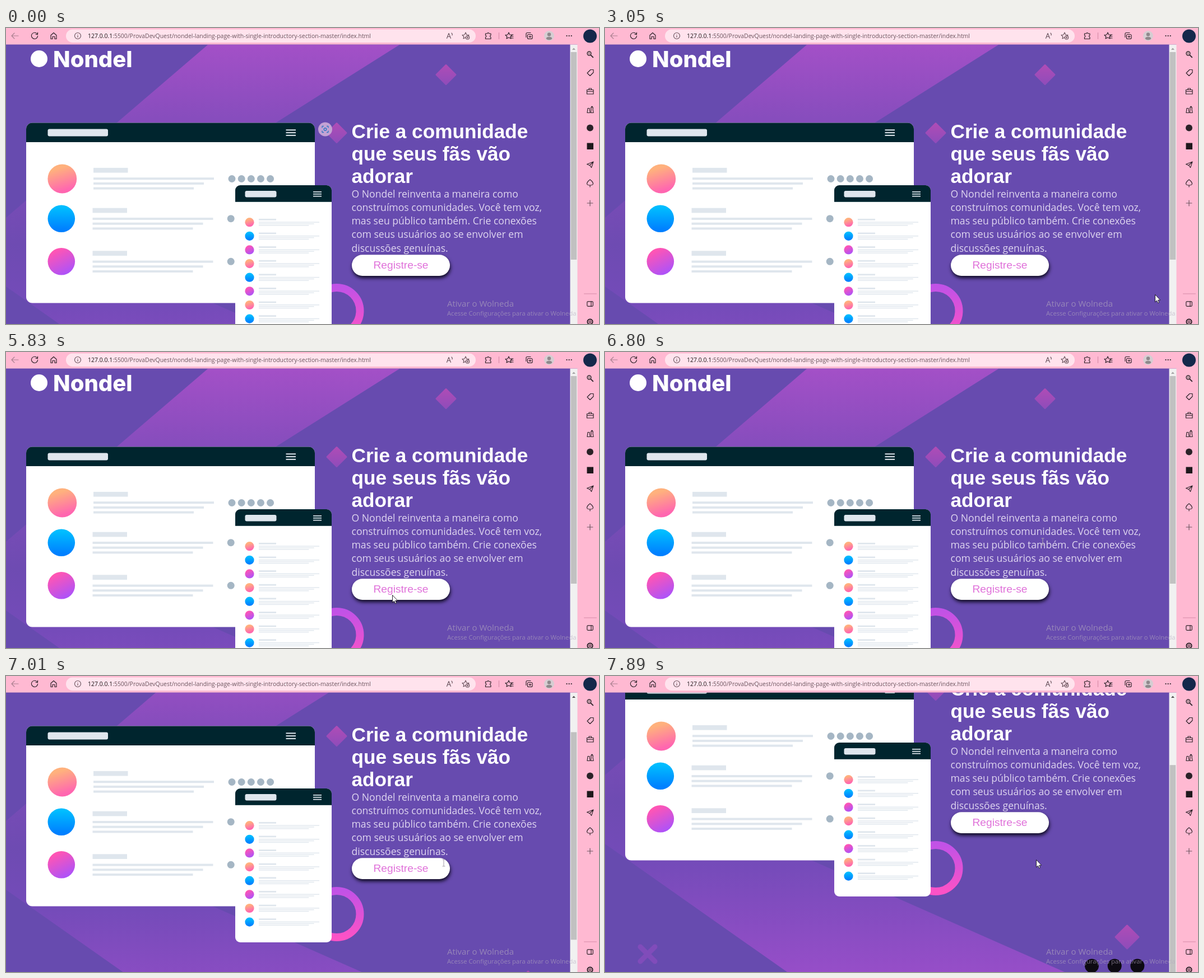
An HTML page for the animation above (8 s loop, 1058 by 529 pixels).

```html
<!DOCTYPE html>
<html lang="pt-BR">
<head>
<meta charset="utf-8">
<title>Nondel</title>
<style>
html, body { margin: 0; width: 100%; height: 100%; overflow: hidden; background: #674baf; }
svg { display: block; width: 1058px; height: 529px; }
.sans { font-family: "Open Sans", "Noto Sans", sans-serif; }
.arial { font-family: "Liberation Sans", Arial, sans-serif; }
.logo { font: 800 40px Inter, sans-serif; }
.line { fill: none; stroke: #2b2228; stroke-width: 1.15; stroke-linecap: round; stroke-linejoin: round; }
.faint { stroke: #d58ca8; }
.soft { stroke: #6a545e; }
.grey { fill: #dfe6ed; }
.dark { fill: #00252e; }
.button { filter: drop-shadow(1px 4px 3px rgba(0, 0, 10, .85)); }
</style>
</head>
<body>
<svg viewBox="0 0 1058 529">
  <defs>
    <clipPath id="view"><rect y="29.5" width="1006.5" height="500"/></clipPath>
    <clipPath id="desk"><rect x="36" y="169.5" width="515" height="322" rx="11"/></clipPath>
    <clipPath id="phone"><rect x="409" y="281" width="172" height="275" rx="9"/></clipPath>
    <linearGradient id="beam" x2="0" y2="1">
      <stop stop-color="#a350c7"/>
      <stop offset=".2" stop-color="#874dbd"/>
      <stop offset=".54" stop-color="#6e4bb2"/>
      <stop offset=".7" stop-color="#744bb9"/>
      <stop offset="1" stop-color="#964ec8"/>
    </linearGradient>
    <linearGradient id="orange" x1=".3" x2=".6" y2="1">
      <stop offset=".15" stop-color="#ffb17d"/><stop offset=".9" stop-color="#ff66b0"/>
    </linearGradient>
    <linearGradient id="blue" x2="0" y2="1">
      <stop offset=".1" stop-color="#00bdff"/><stop offset=".9" stop-color="#0080ff"/>
    </linearGradient>
    <linearGradient id="pink" x1=".25" x2=".75" y2="1">
      <stop offset=".1" stop-color="#ff55b4"/><stop offset=".95" stop-color="#ac52fa"/>
    </linearGradient>
    <linearGradient id="ring" x2="0" y2="1">
      <stop stop-color="#c252e6"/><stop offset="1" stop-color="#fc52c6"/>
    </linearGradient>
    <linearGradient id="gem" x2="1" y2="1">
      <stop stop-color="#b04cb6"/><stop offset="1" stop-color="#8e4cba"/>
    </linearGradient>
    <path id="star" d="M0-6L1.8-2L6-1.500L3 1.500L4 5L0 3L-4 5L-3 1.500L-6-1.500L-1.800-2Z"/>
  </defs>

  <g clip-path="url(#view)">
    <rect width="1007" height="529" fill="#674baf"/>
    <g id="page">
      <path d="M360 30H702L135 388L820 691H325L0 462V339Z" fill="url(#beam)"/>
      <g id="gems" fill="url(#gem)"></g>
      <path d="M63 646l26 26m0-26l-26 26" stroke="#804cba" stroke-width="9" stroke-linecap="round"/>
      <circle cx="590" cy="505.500" r="41.500" fill="none" stroke="url(#ring)" stroke-width="14"/>

      <circle cx="59" cy="55" r="15" fill="#fff"/>
      <text class="logo" x="84" y="70" fill="#fff">Nondel</text>

      <g clip-path="url(#desk)">
        <rect y="169" width="551" height="323" fill="#fff"/>
        <rect class="dark" y="169" width="551" height="35"/>
      </g>
      <rect class="grey" x="74.500" y="180.500" width="107.500" height="13" rx="3"/>
      <g id="deskRows"></g>

      <g clip-path="url(#phone)">
        <rect x="409" y="281" width="172" height="275" fill="#fff"/>
        <rect class="dark" x="409" y="281" width="172" height="29.800"/>
      </g>
      <rect class="grey" x="426.500" y="291" width="56" height="11.500" rx="3"/>
      <g id="phoneRows"></g>

      <g id="title" class="arial" font-size="35.200" font-weight="700" fill="#fff"></g>
      <g id="intro" class="sans" font-size="17.600" fill="#dfd6f0"></g>
      <rect class="button" x="617" y="405.300" width="175" height="37.700" rx="18.850" fill="#fff"/>
      <text class="arial" x="704.500" y="430.300" font-size="19.200" text-anchor="middle" fill="#e072da">Registre-se</text>
      <g id="social"></g>
    </g>
    <g id="lens" transform="translate(569.500 181)">
      <circle r="12.500" fill="#c3a2d4"/>
      <g fill="none" stroke="#2f78c4" stroke-width="1.400">
        <rect x="-5.500" y="-5.500" width="11" height="11" stroke-dasharray="3 5 3 0"/>
        <circle r="2.300"/>
      </g>
    </g>
  </g>

  <rect x="1006.500" y="29.500" width="13.500" height="500" fill="#f1f1f1"/>
  <path id="up" d="M1010 39l3-3.500l3 3.500Z"/>
  <rect id="thumb" x="1007.700" width="10.500" height="371" fill="#c1c1c1"/>

  <path d="M0 0H1058V529H1019.500V29.500H0Z" fill="#ffb9d2"/>
  <rect x="107" y="2.500" width="731" height="23.500" rx="11.750" fill="#ffe3ed"/>
  <text class="sans" x="146" y="18" font-size="10.450" fill="#6a545e"><tspan fill="#1d161a">127.0.0.1</tspan>:5500/ProvaDevQuest/nondel-landing-page-with-single-introductory-section-master/index.html</text>

  <g class="line" transform="translate(0 14)">
    <path d="M22 0H10l5-5m-5 5l5 5" stroke="#a9808f"/>
    <path d="M55.500-3.500A5.600 5.600 0 1 0 56.600 0M56.500-6v3.500H53"/>
    <path d="M80-1l5-4.500l5 4.500v6.500h-3v-4h-4v4h-3Z"/>
    <g class="soft">
      <circle cx="128" r="5.500"/><path d="M128-.5v3m0-5v.1"/>
      <path d="M786.500 4.500l3.500-9l3.500 9m-5.500-3h4M795-5q2 2 1 4"/>
      <use href="#star" x="820"/><circle cx="823.500" cy="3" r="3.200" fill="#ffe3ed"/><path d="M823.500 1.500v3m-1.500-1.500h3"/>
    </g>
    <path d="M855.500-4h3a1.800 1.800 0 0 1 3.500 0h3v3a1.800 1.800 0 0 0 0 3.500v3h-9.500v-3a1.800 1.800 0 0 0 0-3.500Z"/>
    <path class="faint" d="M879.500-5.500v11"/>
    <use href="#star" x="897"/><path d="M902-2h3m-4 3h4m-4 3h4"/>
    <rect x="930.500" y="-2.500" width="8.500" height="8" rx="2"/><path d="M928 2.500v-6q0-2 2-2h6m-1 5v4m-2-2h4"/>
    <path d="M1000.500 0h.1m4 0h.1m4 0h.1" stroke-width="2.200"/>
  </g>
  <circle cx="969" cy="14" r="9" fill="#d6cdd2"/>
  <g fill="#8f888c"><circle cx="969" cy="11.500" r="3.200"/><ellipse cx="969" cy="18.500" rx="5.200" ry="2.800"/></g>
  <circle cx="1042" cy="14.500" r="12" fill="#14284b"/>

  <g class="line" transform="translate(1042 0)">
    <circle cx="-1.500" cy="45.500" r="3.600" fill="#b8939f"/><path d="M1.300 48.300l4 4" stroke-width="1.800"/>
    <path d="M-5 80.500l6-6h5v5l-6 6Z"/>
    <path d="M-5.500 110.500H6V118H-5.500ZM-2 110.500V108H2.500v2.500M-5.500 113.500H6"/>
    <path d="M-5 151.500h5l-1-8h-3ZM1.500 151.500H6L5 145q1-3-1.500-5q-2.500 2-1.500 5Z"/>
    <path d="M-5.500 243.500L6 239l-3.500 10.500l-3-4ZM6 239l-6.500 6.500"/>
    <path d="M0 271q5.500 4 5.500 7.500Q5 281 0 281t-5.500-2.500Q-5.500 275 0 271Zm0 10v3"/>
    <path class="soft" d="M-5 313H5m-5-5v10"/>
    <path class="faint" d="M-10.500 475h22"/>
    <rect x="-5.200" y="488.800" width="10.500" height="8.500" rx="1.500"/><path d="M2 489v8"/>
    <circle cy="525" r="4.600" stroke-width="2" stroke-dasharray="2.400 1.200"/><circle cy="525" r="1.800"/>
  </g>
  <circle cx="1042" cy="178.500" r="6" fill="#2b2228"/>
  <rect x="1036.500" y="205.500" width="11.500" height="11.500" fill="#1f181c"/>

  <g class="sans" fill="#b4aabf" opacity=".62">
    <text x="787" y="498" font-size="15">Ativar o Wolneda</text>
    <text x="787" y="514" font-size="11.200">Acesse Configurações para ativar o Wolneda</text>
  </g>

  <path id="arrow" d="M.5.5v13.300l3-2.800l2 4.500l2.100-.9l-1.900-4.400h4Z" fill="#fff" stroke="#16121c" stroke-width=".9"/>
  <path id="caret" d="M-2.500-6h5M0-6v12M-2.500 6h5" fill="none" stroke="#aaa4ae" stroke-width="1.100"/>
</svg>
<script>
const $ = id => document.getElementById(id);
const tints = ["orange", "blue", "pink"];
const times = (n, make) => Array.from({ length: n }, (_, i) => make(i)).join("");
const bar = (x, y, w, h) => `<rect class="grey" x="${x}" y="${y}" width="${w}" height="${h}"/>`;
const disc = (x, y, r, fill) => `<circle cx="${x}" cy="${y}" r="${r}" fill="${fill}"/>`;
const menu = (x, y, w, gap, h) => times(3, k => bar(x, y + k * gap, w, h));
const gem = (x, y, s) =>
  `<rect x="${-s / 2}" y="${-s / 2}" width="${s}" height="${s}" rx="1.5" transform="translate(${x} ${y}) rotate(45)"/>`;
const lines = (y, gap, text) =>
  text.split("|").map((s, i) => `<text x="616.5" y="${y + i * gap}">${s}</text>`).join("");

$("gems").innerHTML = gem(785, 83.5, 27) + gem(590, 187.5, 27) + gem(931.5, 628.5, 32);
$("social").innerHTML = times(3, i => disc(868.5 + i * 40.7, 680, 12.5, "#0d0a12"));
$("title").innerHTML = lines(197, 40, "Crie a comunidade|que seus fãs vão|adorar");
$("intro").innerHTML = lines(302.5, 24.25, "O Nondel reinventa a maneira como|construímos comunidades. Você tem voz,|" +
  "mas seu público também. Crie conexões|com seus usuários ao se envolver em|discussões genuínas.");

$("deskRows").innerHTML = menu(499.5, 181.3, 17.5, 4.8, 2) + times(3, i => {
  const y = 269.5 + i * 71.2 + (i > 1 ? 5.4 : 0);
  const x = i ? 154.5 : 156, top = i ? y - 1.7 : y - 2.3;
  return disc(i ? 98.8 : 100.3, y, i ? 24.3 : 25.9, `url(#${tints[i]})`)
    + bar(x, top - 17.3, 61.5, 8.7)
    + times(3, k => bar(x, top + k * 8.7, 215 - k * 18, 4))
    + times(i ? 1 : 5, k => disc((i ? 401.2 : 403) + k * 17.15, y, 6.5, "#a5b6c4"));
});

$("phoneRows").innerHTML = menu(548, 292, 15, 3.9, 1.7) + times(8, i => {
  const y = 347.2 + i * 24.63;
  return disc(434.5, y, 8.1, `url(#${tints[i % 3]})`)
    + bar(451, y - 6.3, 31, 2.8)
    + times(3, k => bar(451, y - .8 + k * 2.85, 108 - k * 9.3, 1.4));
});

// Pointer strokes: start, end, steps, target x and y.
const strokes = `260 390 3 994 487
  650 720 2 991 487
  1990 2190 4 980 482
  3050 3050 1 981 476
  3120 3530 7 697 278
  3860 3930 2 796 242
  4000 4560 9 84 80
  4630 4630 1 131 82
  4690 4830 3 222 84
  4900 5110 4 288 275
  5260 5760 8 676 437
  5830 6050 4 727 424
  6110 6600 8 788 322
  6660 6800 3 781 339
  6940 7140 4 781 328
  7280 7420 3 769 328`.split("\n").map(row => row.trim().split(" ").map(Number));
const entry = [1008, 505];

// Wheel notches: start and distance.
const notches = [[6865, 80], [7072, 82], [7480, -81], [7746, 81]];

function pointer(t) {
  const i = strokes.findLastIndex(s => s[0] <= t);
  if (i < 0) return null;
  const [from, to, steps, ...target] = strokes[i];
  const begin = i ? strokes[i - 1].slice(3) : entry;
  const gap = (to - from) / (steps - 1) || 1;
  const u = Math.min(steps, 1 + Math.floor((t + 6 - from) / gap)) / steps;
  const f = steps > 6 ? u * u * (3 - 2 * u) : u;
  return target.map((end, k) => begin[k] + (end - begin[k]) * f);
}

function scrolled(t) {
  const ease = [0, .65, .9, 1];
  return Math.round(notches.reduce((sum, [from, size]) => {
    const step = Math.floor((t - from) / 68) + 1;
    return sum + size * ease[Math.max(0, Math.min(3, step))];
  }, 0));
}

const overText = ([x, y]) => x > 617 && x < 955 && y > 166 && y < 404 && (y > 286 || y < 246 || x < 727);

function place(id, pos) {
  $(id).style.display = pos ? "" : "none";
  if (pos) $(id).setAttribute("transform", `translate(${pos.map(Math.round)})`);
}

function draw(t) {
  const y = scrolled(t), pos = pointer(t);
  const text = pos && t < 7270 && overText(pos);
  $("page").setAttribute("transform", `translate(0 ${-y})`);
  $("thumb").setAttribute("y", 43 + y * .717);
  $("up").setAttribute("fill", y ? "#505050" : "#a3a3a3");
  $("lens").style.display = t < 260 ? "" : "none";
  place("arrow", text ? null : pos);
  place("caret", text ? pos : null);
}

let start;
function tick(now) {
  start ??= now;
  draw((now - start) % 8000);
  requestAnimationFrame(tick);
}
draw(0);
requestAnimationFrame(tick);
</script>
</body>
</html>
```
